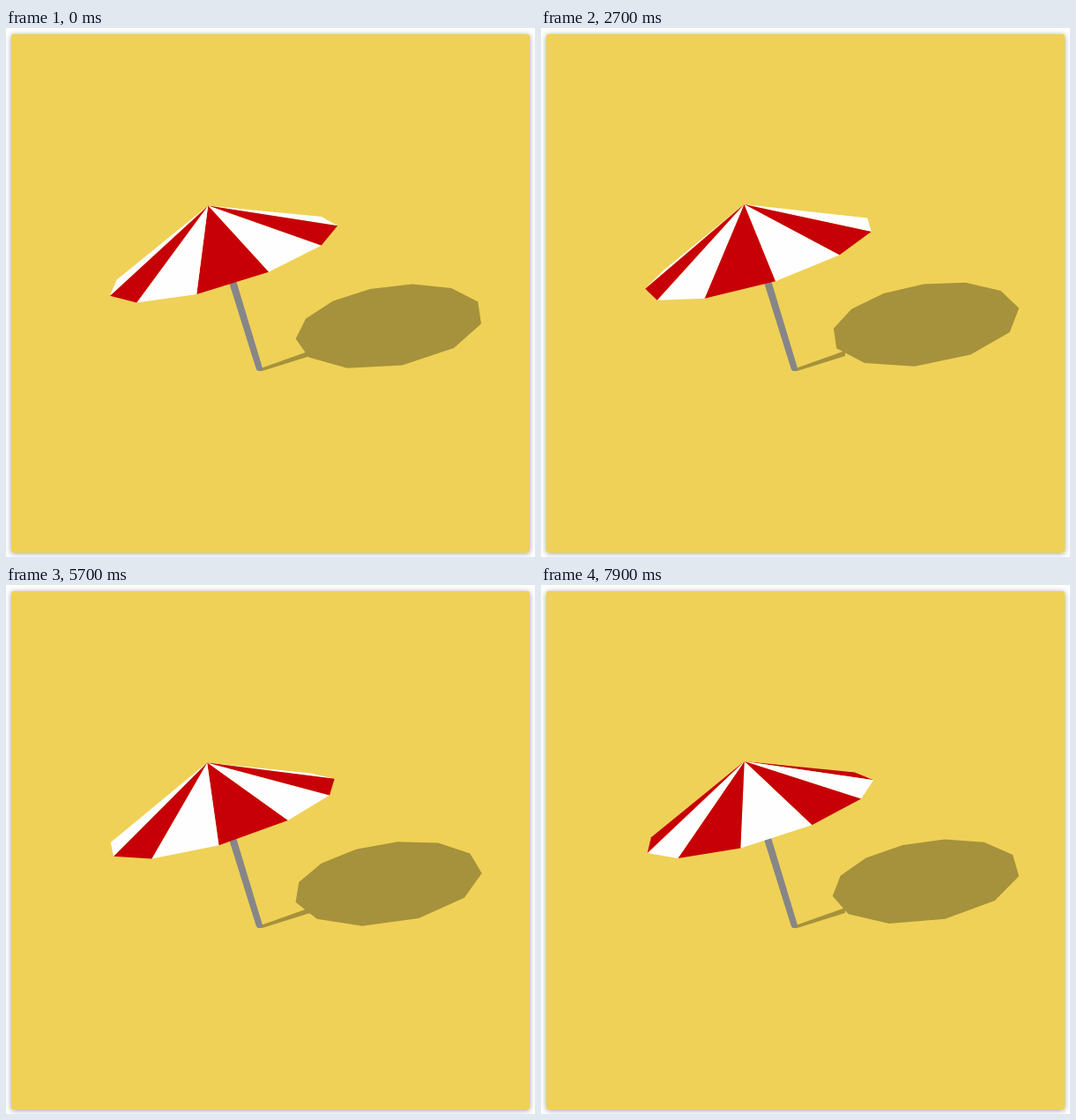
An HTML page with a canvas for the animation above (8000 ms loop, 600 by 600 pixels).

```html
<!DOCTYPE html>
<html lang="en">
<head>
<meta charset="utf-8">
<title>Beach umbrella</title>
<style>
html, body { margin: 0; width: 100%; height: 100%; overflow: hidden; background: #fff; }
canvas {
  position: absolute; left: 6px; top: 7px; width: 588px; height: 588px;
  border-radius: 2px; box-shadow: 0 1px 6px rgba(0, 0, 0, .38);
}
</style>
</head>
<body>
<canvas width="588" height="588"></canvas>
<script>
const ctx = document.querySelector('canvas').getContext('2d');
const SIDES = 12, LOOP = 8000, STEP = 100, RAD = Math.PI / 180;
const cos = deg => Math.cos(deg * RAD), sin = deg => Math.sin(deg * RAD);

// Circles seen in perspective: [constant, cosine, sine] for x, y and depth
const RIM = { x: [244.8, 133.8, -4.3], y: [256.3, -29.5, -34.6], w: [1, .06, -.197] };
const SHADE = { x: [428.4, -51.5, 88.8], y: [332.2, 34.2, -5.4], w: [1, .11, .125] };

function ring(shape, turn, [dx, dy]) {
  return Array.from({ length: SIDES }, (_, i) => {
    const c = cos(i * 30 + turn), s = sin(i * 30 + turn);
    const at = ([k, a, b]) => k + a * c + b * s;
    const w = at(shape.w);
    return [at(shape.x) / w + dx, at(shape.y) / w + dy];
  });
}

function fill(points, color) {
  ctx.fillStyle = color;
  ctx.beginPath();
  points.forEach(p => ctx.lineTo(...p));
  ctx.closePath();
  ctx.fill();
}

function draw(ms) {
  const spin = ms * .072;
  const turn = spin - .3 + 1.05 * cos(spin - 30);
  const sway = [-1.6 * cos(spin - 75), .7 * cos(spin - 25)];
  const shadeSway = [.4 - 2.4 * cos(spin - 80), 1.2 * cos(spin - 30) - 1];

  ctx.setTransform(1, 0, 0, 1, -6, -7);
  ctx.fillStyle = '#efd157';
  ctx.fillRect(0, 0, 600, 600);

  ctx.filter = 'blur(0.7px)';
  fill([[289, 386], [345, 366], [345, 372], [289, 389.5]], '#a6913c');
  fill(ring(SHADE, turn, shadeSway), '#a6913c');
  ctx.filter = 'none';

  fill([[244, 260], [253, 260], [291.2, 386.5], [289, 389], [285.5, 389], [283.8, 387]], '#868689');

  const top = [229.6 + sway[0], 200.8 + sway[1]];
  const rim = ring(RIM, turn, [sway[0] + .4, sway[1] - .6]);
  rim.forEach((a, i) => {
    const b = rim[(i + 1) % SIDES];
    const facing = (a[0] - top[0]) * (b[1] - top[1]) - (a[1] - top[1]) * (b[0] - top[0]);
    if (facing > 0) fill([top, a, b], i % 2 ? '#c70008' : '#fffefe');
  });
}

const start = performance.now();
function tick() {
  const ms = (performance.now() - start) % LOOP;
  draw(Math.floor(ms / STEP) * STEP);
  requestAnimationFrame(tick);
}
tick();
</script>
</body>
</html>
```
